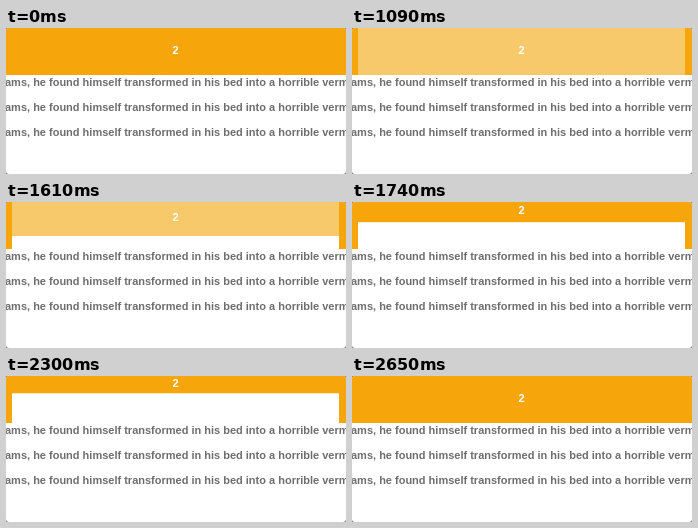
Write an HTML page that moves like this. It is 340x146 px and loops after 3560 ms.

```html
<!DOCTYPE html>
<html lang="en">
<head>
<meta charset="utf-8">
<title>Collapsing header</title>
<style>
  html, body { margin: 0; width: 100%; height: 100%; overflow: hidden; background: #fff; }
  svg { display: block; width: 100%; height: 100%; }
  text { font: bold 11px "Liberation Sans", Arial, Helvetica, sans-serif; }
</style>
</head>
<body>
<svg viewBox="0 0 340 146">
  <defs>
    <clipPath id="card"><rect width="340" height="146" rx="3"/></clipPath>
  </defs>
  <rect width="340" height="146" fill="#777"/>
  <g clip-path="url(#card)">
    <rect width="340" height="146" fill="#fff"/>
    <rect width="340" height="47" fill="#f6a50b"/>
    <rect x="6" width="327" height="47" fill="#fff"/>
    <rect id="bar" x="6" width="327" height="47" fill="#f6a50b"/>
    <text id="count" x="169.5" y="25.5" text-anchor="middle" fill="#fff">2</text>
    <g id="lines" fill="#6e6e6e"></g>
  </g>
</svg>
<script>
  const LOOP = 3560, FULL = 47, RELEASED = 34;
  const PRESS = 1090, RELEASE = 1650;
  const SENTENCE = "ams, he found himself transformed in his bed into a horrible vermin";
  const $ = id => document.getElementById(id);
  const bar = $("bar"), count = $("count");

  for (const y of [58, 83, 108]) {
    const line = document.createElementNS("http://www.w3.org/2000/svg", "text");
    line.setAttribute("x", -1);
    line.setAttribute("y", y);
    line.textContent = SENTENCE;
    $("lines").append(line);
  }

  const progress = (t, start, length) => Math.min(1, Math.max(0, (t - start) / length));
  const mix = (a, b, k) => a + (b - a) * k;
  const easeOut = (k, power) => 1 - (1 - k) ** power;

  // Dragged up slowly, let go, then opened again
  function barHeight(t) {
    if (t < RELEASE) return mix(FULL, RELEASED, progress(t, 1200, 410) ** 2.5);
    if (t < 2240) return mix(RELEASED, 0, easeOut(progress(t, RELEASE, 310), 1.5));
    return mix(0, FULL, easeOut(progress(t, 2240, 430), 3));
  }

  function draw(t) {
    const h = barHeight(t);
    const pressed = t >= PRESS && t < RELEASE;
    const dip = Math.sin(Math.PI * progress(t, 170, 220));
    bar.setAttribute("height", h.toFixed(2));
    bar.setAttribute("fill", pressed ? "#f8c96a" : "#f6a50b");
    count.setAttribute("y", (h / 2 + 2).toFixed(2));
    count.setAttribute("opacity", (1 - 0.25 * dip).toFixed(3));
    count.setAttribute("visibility", h < 0.5 ? "hidden" : "visible");
  }

  const start = performance.now();
  function tick() {
    draw((performance.now() - start) % LOOP);
    requestAnimationFrame(tick);
  }
  tick();
</script>
</body>
</html>
```
